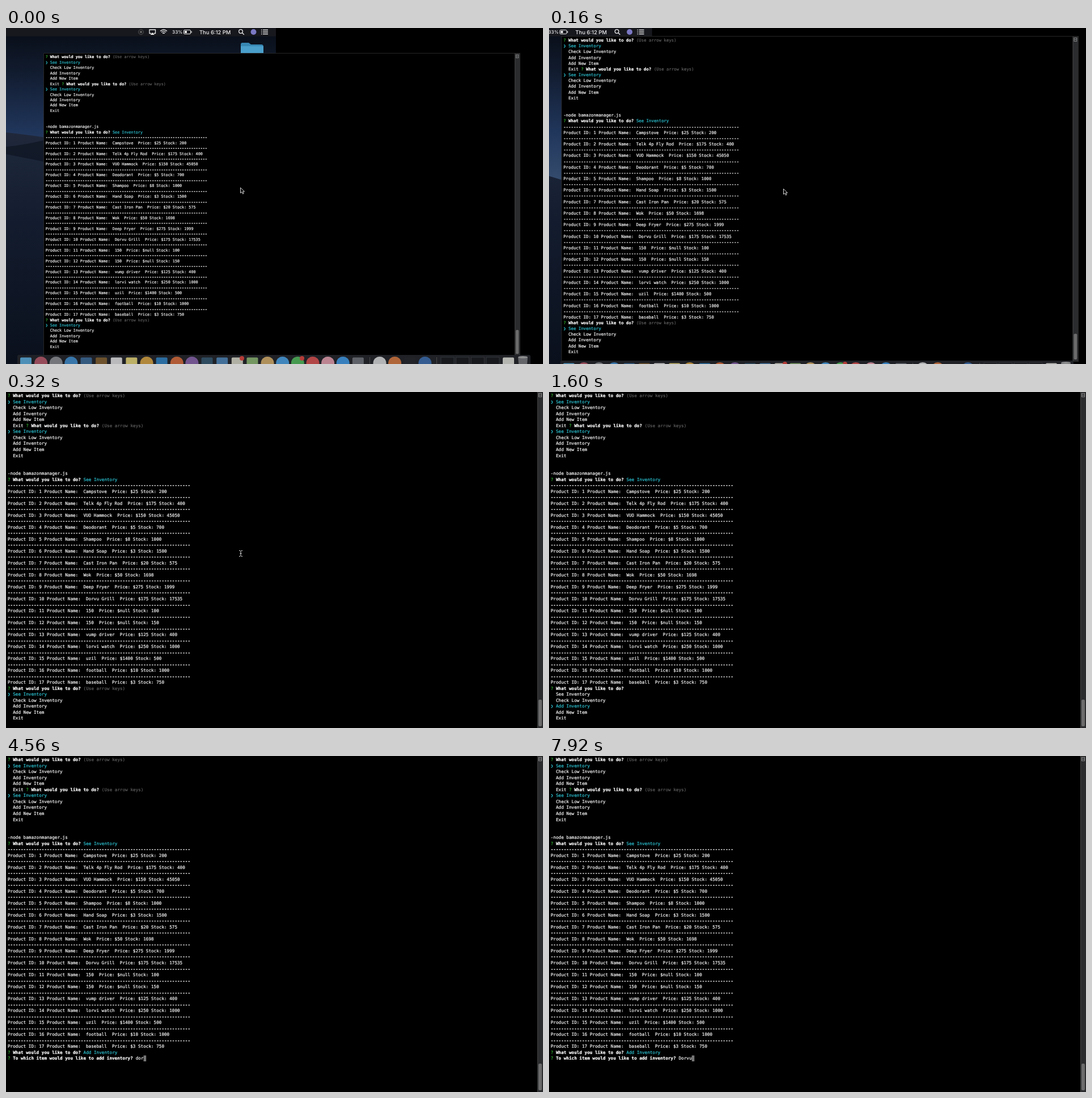
These frames come from a looping animation (947x592 px, 8000 ms). An HTML page:

```html
<!DOCTYPE html>
<html lang="en">
<head>
<meta charset="utf-8">
<title>Inventory manager</title>
<style>
  html, body { margin: 0; width: 100%; height: 100%; overflow: hidden; background: #000; }
  svg { display: block; width: 100%; height: 100%; }
  text { white-space: pre; text-rendering: geometricPrecision; }
  #term text {
    font: 7.652px "DejaVu Sans Mono", monospace;
    color: #f4f4f4; fill: currentColor; stroke: currentColor; stroke-width: .22;
  }
  #term .bold { font-weight: bold; color: #fff; }
  #term .cyan { color: #2bbfce; }
  #term .green { color: #32b432; }
  #term .dim { color: #686868; stroke-width: .1; }
  #term .rule { stroke-width: .6; color: #dedede; }
  #bar text { font: 500 9.4px Inter, sans-serif; fill: #f4f4f4; }
</style>
</head>
<body>
<svg id="stage" viewBox="0 0 947 592" preserveAspectRatio="none">
  <defs>
    <linearGradient id="sky" x1="0" y1="0" x2="0" y2="300" gradientUnits="userSpaceOnUse">
      <stop offset="0" stop-color="#080d16"/>
      <stop offset=".25" stop-color="#111b2e"/>
      <stop offset=".6" stop-color="#20355a"/>
      <stop offset="1" stop-color="#3c5475"/>
    </linearGradient>
    <linearGradient id="dune" x1="0" y1="180" x2="0" y2="592" gradientUnits="userSpaceOnUse">
      <stop offset="0" stop-color="#20283a"/>
      <stop offset=".12" stop-color="#1c2639"/>
      <stop offset=".4" stop-color="#131c2e"/>
      <stop offset="1" stop-color="#0a101c"/>
    </linearGradient>
  </defs>
  <rect width="947" height="592" fill="#000"/>

  <g id="desktop">
    <rect width="947" height="592" fill="url(#sky)"/>
    <path d="M0 160Q300 165 471 184T640 224L766 261L947 315V592H0Z" fill="url(#dune)"/>
    <path d="M420 212Q490 212 560 192L640 224L540 236Z" fill="#0d1422" opacity=".7"/>
    <path d="M885 29q0-3 3-3h11l4 3h18q4 0 4 4v24h-40z" fill="#3787b3"/>
    <path d="M885 32h40v24h-40z" fill="#4a9fcb"/>
    <g id="bar">
      <rect width="947" height="14.5" fill="#17181d"/>
      <circle cx="709" cy="7" r="4.5" fill="none" stroke="#555"/>
      <rect x="707" y="5" width="4" height="4" fill="#555"/>
      <g fill="none" stroke="#eee" stroke-width="1.3">
        <path d="M727 9.500h-3v-6.500h10.500v6.500h-3"/>
        <path d="M743 5.500q6-5 12 0M745 7.500q4-3.300 8 0M747 9.500q2-1.500 4 0"/>
        <rect x="784.500" y="3.500" width="12" height="7" rx="1.500" stroke-width="1"/>
        <circle cx="885" cy="6" r="3.300"/>
        <path d="M887.500 8.500l3.300 3.300M924 3.500h9M924 7h9M924 10.500h9"/>
        <path d="M921 3.500h1.500M921 7h1.500M921 10.500h1.500"/>
      </g>
      <path d="M725.500 12l3.700-4 3.700 4z" fill="#eee"/>
      <rect x="786" y="5" width="4" height="4" fill="#eee"/>
      <rect x="797.500" y="5.500" width="1.200" height="3" fill="#eee"/>
      <text x="764" y="10.300" style="font-size:8.200px">33%</text>
      <text x="812" y="10.500">Thu 6:12 PM</text>
      <circle cx="907.500" cy="7" r="5" fill="#7b78c4"/>
    </g>
  </g>

  <g id="term">
    <rect x="-.5" y="-.5" width="948" height="593" fill="#000" stroke="#2a2a2a"/>
    <rect x="937" width="10" height="592" fill="#2b2c2e"/>
    <rect x="937" width="1" height="592" fill="#444"/>
    <rect x="939.500" y="2.500" width="5" height="6" fill="none" stroke="#8a8a8a"/>
    <path d="M940 5.500h4" stroke="#8a8a8a"/>
    <rect x="939" y="542" width="6" height="47" rx="2" fill="#6c6c6c"/>
    <g id="log"></g>
    <g id="prompt"></g>
  </g>

  <g id="dock"></g>

  <path id="arrow" d="M0 0V9.500L2.300 7.400L4 11L5.700 10.200L4.100 6.800H7Z" fill="#000" stroke="#eee" stroke-width=".9"/>
  <path id="beam" d="M411 279.500h2l1 1 1-1h2M414 280.500v8M411 289.500h2l1-1 1 1h2M412.500 284.500h3" fill="none" stroke="#ddd"/>
</svg>
<script>
const LOOP = 8000, STEP = 80, OPEN = 320;
const CELL = 4.607, LINE = 10.52;
const $ = id => document.getElementById(id);
const ASK = "What would you like to do?";
const CHOICES = ["See Inventory", "Check Low Inventory", "Add Inventory", "Add New Item", "Exit"];
const PRODUCTS = [
  "Campstove|25|200", "Telk 4p Fly Rod|175|400", "VUO Hammock|150|45050", "Deodorant|5|700",
  "Shampoo|8|1000", "Hand Soap|3|1500", "Cast Iron Pan|20|575", "Wok|50|1698",
  "Deep Fryer|275|1999", "Dorvu Grill|175|17535", "150|null|100", "150|null|150",
  "vump driver|125|400", "lorvi watch|250|1000", "uzil|1400|500", "football|10|1000", "baseball|3|750"
];
const MENU_ROW = 49, SUBMIT = 2560;
const MOVES = [[0, 0], [1200, 1], [1440, 2]];
const TYPED = [
  [SUBMIT, ""], [4160, "d"], [4320, "do"], [4560, "dor"], [5920, "do"], [6240, "d"], [6720, ""],
  [7040, "D"], [7200, "Do"], [7360, "Dor"], [7520, "Dorv"], [7680, "Dorvu"]
];

function add(parent, tag, attrs, text) {
  const el = document.createElementNS("http://www.w3.org/2000/svg", tag);
  for (const key in attrs) el.setAttribute(key, attrs[key]);
  if (text) el.textContent = text;
  parent.appendChild(el);
  return el;
}

function put(parent, row, col, text, style = "") {
  add(parent, "text", { x: 3 + col * CELL, y: 9.3 + row * LINE, class: style }, text);
}

function ask(parent, row, col, question) {
  put(parent, row, col, "?", "green");
  put(parent, row, col + 2, question, "bold");
}

function choices(parent, row, picked) {
  CHOICES.forEach((name, i) => {
    const on = i === picked;
    if (on) put(parent, row + i, 0, "❯", "cyan");
    put(parent, row + i, 2, name, on ? "cyan" : "");
  });
}

function buildLog() {
  const log = $("log");
  for (const [row, col] of [[0, 0], [5, 7]]) {
    ask(log, row, col, ASK);
    put(log, row, col + 29, "(Use arrow keys)", "dim");
    choices(log, row + 1, 0);
  }
  put(log, 13, 0, "-node bamazonmanager.js");
  ask(log, 14, 0, ASK);
  put(log, 14, 29, CHOICES[0], "cyan");
  PRODUCTS.forEach((item, i) => {
    const [name, price, stock] = item.split("|");
    put(log, 15 + 2 * i, 0, "-".repeat(70), "rule");
    put(log, 16 + 2 * i, 0, `Product ID: ${i + 1} Product Name:  ${name}  Price: $${price} Stock: ${stock}`);
  });
}

function buildDock() {
  const dock = $("dock");
  add(dock, "rect", { x: 20, y: 576, width: 905, height: 40, rx: 3, fill: "#1f2126" });
  const tray = add(dock, "g", { opacity: .78 });
  // s = square, c = circle
  const icons = ("s5aaee0 cb9596b c8c8f94 c3f8ed0 s3b6a9a s83602f se6e6e6 se9d779 cd9a441 s2f83c4 " +
    "cd96c3a c8a63ad s33566e s4c86b8 sd9d9c8 s8db872 cd8b06a c4aa3e6 c52bd5c cdc5050 ce8a0b0 " +
    "c3f9be8 s70747a").split(" ");
  const running = "cdcdcdc cd9793f s222429 c3a6db0".split(" ");
  const icon = (spec, x) => {
    const fill = "#" + spec.slice(1);
    if (spec[0] === "c") add(tray, "circle", { cx: x, cy: 590.5, r: 11.5, fill });
    else add(tray, "rect", { x: x - 10, y: 580.5, width: 20, height: 24, rx: 2, fill });
  };
  icons.forEach((spec, i) => icon(spec, 35 + 26.63 * i));
  running.forEach((spec, i) => icon(spec, 659 + 26.63 * i));
  for (const x of [416, 522]) add(tray, "circle", { cx: x, cy: 582, r: 4, fill: "#e0443e" });
  for (const x of [641, 759]) add(tray, "rect", { x, y: 580, width: 1, height: 20, fill: "#555" });
  for (let i = 0; i < 4; i++)
    add(tray, "rect", { x: 767 + 26.63 * i, y: 580, width: 23, height: 20, fill: "#15171b", stroke: "#393c41" });
  icon("se0e0d8", 886);
  add(tray, "path", { d: "M903 580h17l-2 24h-13z", fill: "#77797c" });
  add(tray, "ellipse", { cx: 911.5, cy: 580, rx: 8.5, ry: 2, fill: "#aaa" });
}

const latest = (list, t) => list.filter(([at]) => at <= t).pop()[1];

let shown = "";
function drawPrompt(t) {
  const done = t >= SUBMIT;
  const value = latest(done ? TYPED : MOVES, t);
  const key = done + ":" + value;
  if (key === shown) return;
  shown = key;
  const box = $("prompt");
  box.replaceChildren();
  ask(box, MENU_ROW, 0, ASK);
  if (!done) {
    if (value === 0) put(box, MENU_ROW, 29, "(Use arrow keys)", "dim");
    choices(box, MENU_ROW + 1, value);
    return;
  }
  put(box, MENU_ROW, 29, CHOICES[2], "cyan");
  ask(box, MENU_ROW + 1, 0, "To which item would you like to add inventory?");
  put(box, MENU_ROW + 1, 49, value);
  add(box, "rect", {
    x: 3 + (49 + value.length) * CELL, y: 527.6, width: CELL, height: 10.4, fill: "#777"
  });
}

function render(t) {
  const left = 1 - Math.min(1, t / OPEN);
  const inset = left ** 1.57, slide = left ** 1.39;
  const moving = left > 0;
  const show = (id, on) => $(id).setAttribute("visibility", on ? "visible" : "hidden");

  $("term").setAttribute("transform",
    `translate(${67 * inset} ${45 * inset}) scale(${1 - 108 * inset / 947} ${1 - 60 * inset / 592})`);
  $("desktop").setAttribute("transform", `translate(${476 * slide - 947} 0)`);
  $("dock").setAttribute("transform", `translate(0 ${15 * (1 - inset)})`);
  $("arrow").setAttribute("transform", `translate(413.5 ${281.3 + 3.3 * (1 - inset)})`);
  show("desktop", moving);
  show("dock", moving);
  show("arrow", moving);
  show("beam", !moving && t < MOVES[1][0]);
  drawPrompt(t);
}

buildLog();
buildDock();
const start = performance.now();
function tick() {
  const t = (performance.now() - start) % LOOP;
  render(Math.floor(t / STEP) * STEP);
  requestAnimationFrame(tick);
}
tick();
</script>
</body>
</html>
```
